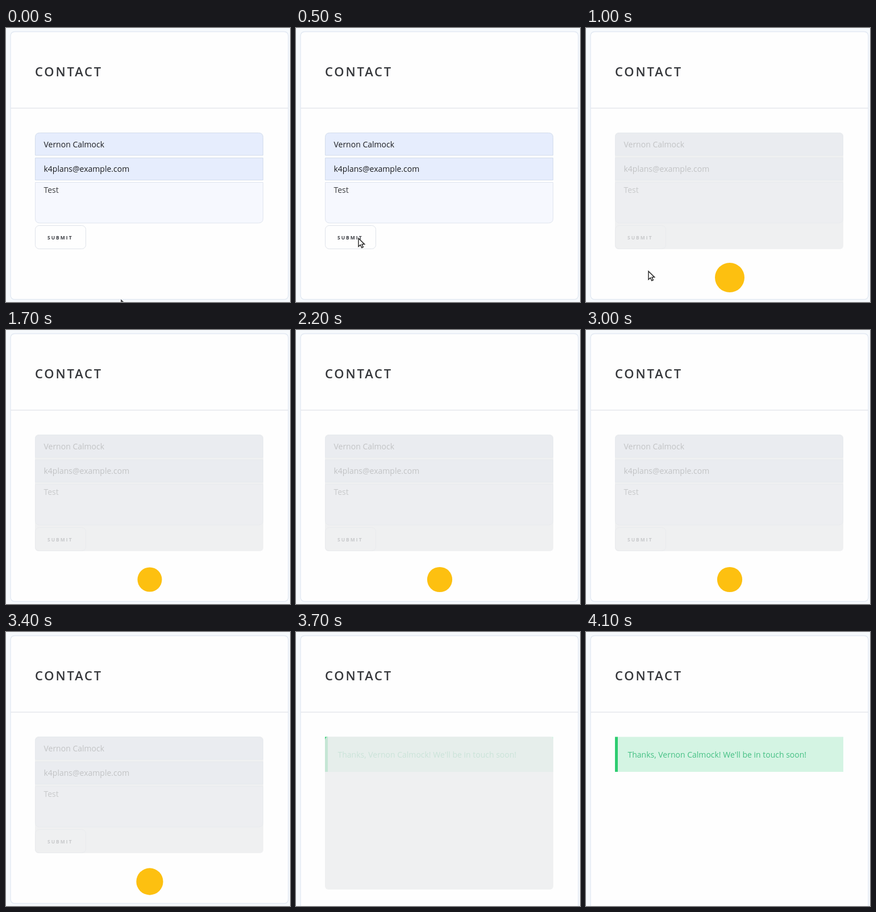
Write an HTML page that moves like this. It is 500 px wide and 482 px high and loops after 8.6 s.

```html
<!DOCTYPE html>
<html lang="en">
<head>
<meta charset="utf-8">
<title>Contact form</title>
<style>
  html, body { margin: 0; width: 100%; height: 100%; overflow: hidden; background: #f6f9fc; }
  svg { display: block; width: 500px; height: 482px; }
  text { font: 14px "Open Sans", "Noto Sans", sans-serif; fill: #1c1d20; }
  .title { font-size: 22px; font-weight: 600; letter-spacing: 2.8px; fill: #35373b; }
  .button { font-size: 8.5px; font-weight: 700; letter-spacing: 2px; fill: #3a3c42; }
  .note { fill: #45c084; }
  .field { fill: #e6edfd; stroke: #d3ddec; }
</style>
</head>
<body>
<svg viewBox="0 0 500 482">
  <rect id="card" x="8" y="6.5" width="489" height="471" rx="7" fill="#fefefe" stroke="#e1e8f2" stroke-width="1.3"/>
  <path d="M8 141H497" stroke="#e4e7ec" stroke-width="1.5"/>
  <text class="title" x="51" y="84.5">CONTACT</text>

  <g id="form">
    <path class="field" d="M51.5 224V192.5q0-8 8-8H444.5q8 0 8 8V224z"/>
    <path class="field" d="M51.5 228.5H452.5V267.5H51.5z"/>
    <path d="M51.5 271.5H452.5V335q0 8-8 8H59.5q-8 0-8-8z" fill="#f6f8fe" stroke="#dfe4ee"/>
    <rect x="51.5" y="347.5" width="89" height="41" rx="7" fill="#fefefe" stroke="#dfe3ea"/>
    <text x="66.5" y="210">Vernon Calmock</text>
    <text x="66.5" y="253">k4plans@example.com</text>
    <text x="66.5" y="290" fill-opacity=".85">Test</text>
    <text class="button" x="73" y="371.5">SUBMIT</text>
  </g>

  <g id="thanks">
    <path d="M51 184.5H453V246H51z" fill="#d4f4e3"/>
    <path d="M51 184.5H56V246H51z" fill="#2ecc71"/>
    <text class="note" x="73.5" y="220.5">Thanks, Vernon Calmock! We'll be in touch soon!</text>
  </g>

  <rect id="veil" x="51" y="184" width="402" rx="6" fill="#ecedee"/>
  <circle id="loader" cx="253" cy="439" fill="#fdc010"/>
  <path id="cursor" d="M0 0V14.5L3.4 11.4L5.8 16.6L8.3 15.4L6 10.4H10.6z" fill="#fff" stroke="#222" stroke-width="1.4"/>
</svg>
<script>
const LOOP = 8600, STEP = 100;
const SEND = 1000, DONE = 3700, CLEAR = 4100;
const PULSE = 455, SMALLEST = 1690;
const VEIL = 0.8;

// time, x, y of the pointer tip
const route = [[0, 203, 479], [500, 110, 370], [800, 110, 370], [1000, 110, 428], [1400, 100, 486]];

const el = id => document.getElementById(id);
const show = (id, on) => el(id).setAttribute("visibility", on ? "visible" : "hidden");
const ease = p => p * p * (3 - 2 * p);

function pointer(t) {
  const i = route.findIndex(stop => stop[0] > t);
  if (i < 0) return route.at(-1).slice(1);
  const [a, b] = [route[i - 1], route[i]];
  const p = ease((t - a[0]) / (b[0] - a[0]));
  return [1, 2].map(k => a[k] + (b[k] - a[k]) * p);
}

function draw(t) {
  const sent = t >= SEND, done = t >= DONE;
  show("form", !done);
  show("thanks", done);
  show("loader", sent && !done);
  show("cursor", t < 1400);
  el("card").setAttribute("height", done ? 520 : 471);

  const fade = done ? Math.max(0, (CLEAR - t) / (CLEAR - DONE)) : 1;
  el("veil").setAttribute("height", done ? 269 : 205);
  el("veil").setAttribute("opacity", sent ? VEIL * fade : 0);

  const wave = Math.cos(2 * Math.PI * (t - SMALLEST) / PULSE);
  el("loader").setAttribute("r", 23.75 - 2.25 * wave);
  el("cursor").setAttribute("transform", `translate(${pointer(t)})`);
}

function tick() {
  const t = performance.now() % LOOP;
  draw(Math.floor(t / STEP) * STEP);
  requestAnimationFrame(tick);
}
tick();
</script>
</body>
</html>
```
